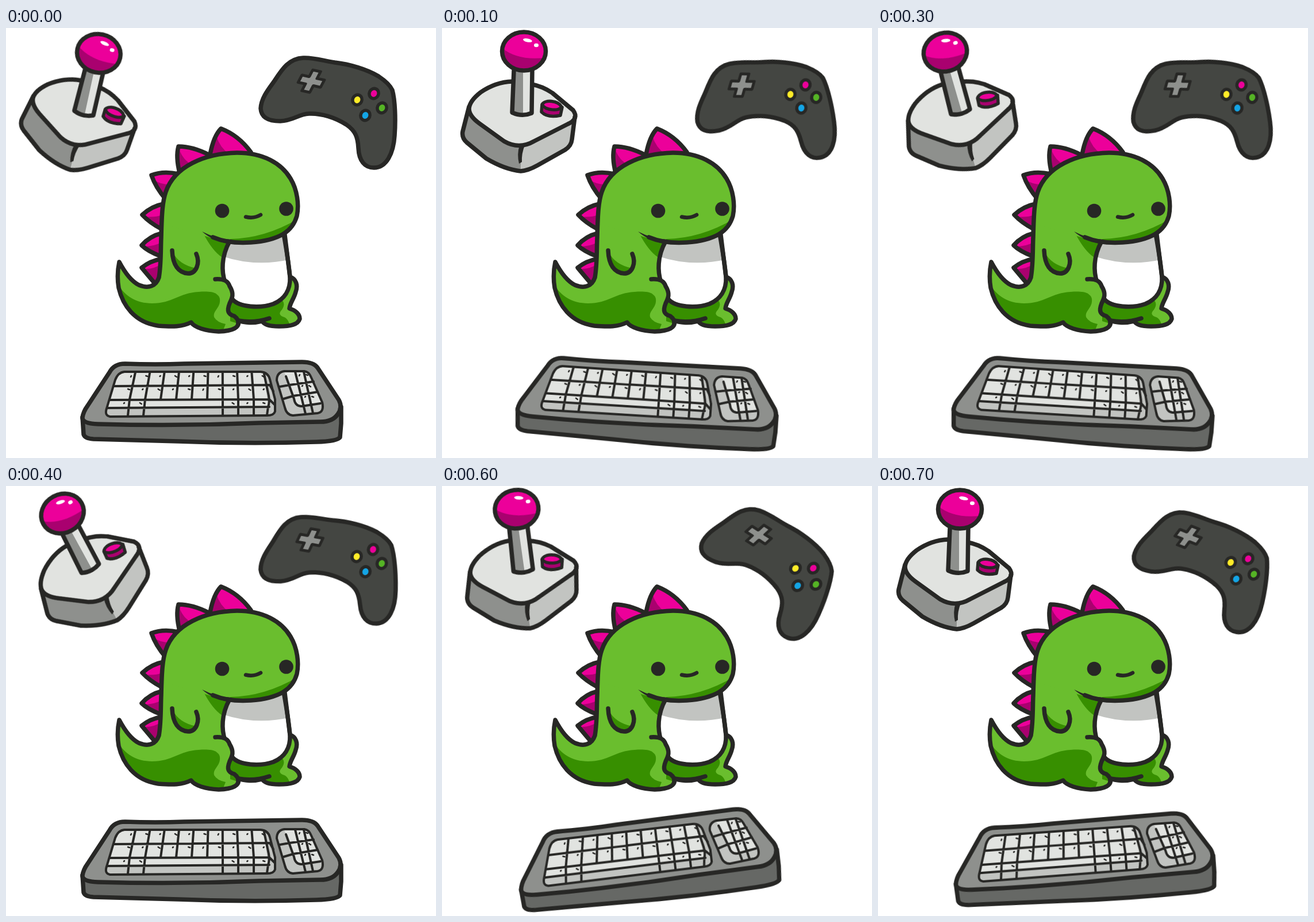
An HTML page for the animation above (800 ms loop, 748 by 748 pixels).

```html
<!DOCTYPE html>
<html lang="en">
<head>
<meta charset="utf-8">
<title>Game time</title>
<style>
html, body { margin: 0; width: 100%; height: 100%; overflow: hidden; background: #fff; }
svg { display: block; width: 100vw; height: 100vh; }
.line { fill: none; stroke: #272725; stroke-width: 7.5; stroke-linecap: round; stroke-linejoin: round; }
.thin { stroke-width: 4; }
.ink { fill: #272725; }
.green { fill: #6abe2e; }
.leaf { fill: #378f00; }
.pink { fill: #ec009a; }
.plum { fill: #a9016f; }
.pale { fill: #e1e3e0; }
.mid { fill: #c2c4c1; }
.grey { fill: #8e908d; }
.slate { fill: #666865; }
.coal { fill: #444642; }
.white { fill: #fff; }
#stick { transform-origin: 134.8px 130.7px; }
#pad { transform-origin: 561px 145px; }
#board { transform-origin: 352px 650px; }
</style>
</head>
<body>
<svg viewBox="0 0 748 748">
<defs>
  <clipPath id="ball"><ellipse cx="142.500" cy="40.500" rx="38" ry="33.500"/></clipPath>
  <clipPath id="belly"><path id="bellyShape" d="M389 371C374 398 375 424 381 442L394 472C406 486 442 488 465 480C484 472 495 456 494 433L484 352Z"/></clipPath>
  <clipPath id="body"><path id="bodyShape" d="M197 407C206 424 217 440 231 447C248 454 261 449 266 434C270 411 269 386 270 364C271 324 272 302 278 285C293 241 345 218 402 217C447 217 479 235 495 262C507 282 510 308 506 327C502 341 494 351 483 358C488 386 492 412 494 433C505 436 508 448 504 459C501 471 494 478 493 488C504 491 511 498 511 506C508 516 495 519 475 519C462 519 449 517 446 510C431 514 415 513 404 509C407 521 395 527 370 528C347 527 328 521 322 512C306 520 290 520 265 518C223 512 203 482 196 452C193 434 194 421 197 407Z"/></clipPath>
</defs>

<g id="stick">
  <path class="grey" d="M47 137L36 180Q34 191 43 199L77 227Q109 246 137 249L139 203L65 166Z"/>
  <path class="mid" d="M139 203L137 249Q150 248 166 239L214 212Q225 205 226 194L231 155Z"/>
  <path class="line pale" d="M122 93Q93 94 67 112Q48 127 47 140Q47 153 65 166L108 197Q134 212 160 197L219 167Q239 158 228 143L192 113Q174 101 156 98Z"/>
  <path class="line" d="M47 137L36 180Q34 191 43 199L77 227Q109 246 137 249Q150 248 166 239L214 212Q225 205 226 194L231 155"/>
  <path class="ink" d="M135 204L144 204Q138 219 139 233L134 236Q130 219 135 204Z"/>
  <path class="plum" d="M174 134V147Q184 156 206 152L209 139Z"/>
  <ellipse class="pink" cx="191" cy="134.500" rx="18" ry="8" transform="rotate(9 191 134)"/>
  <path class="line" style="stroke-width:5.500" d="M174 133C179 124 202 126 208 137C205 145 180 144 174 133L173 146Q184 157 206 152L209 138"/>
  <path class="pale" d="M125 70L123 147Q139 154 156 148L157 70Z"/>
  <path class="grey" d="M125 70L123 147Q132 151 141 151V70Z"/>
  <path class="line" d="M125 74L122 147Q139 155 156 148L157 72"/>
  <ellipse class="pink" cx="142.500" cy="40.500" rx="38" ry="33.500"/>
  <path class="plum" clip-path="url(#ball)" d="M100 31Q130 59 184 51V84H100Z"/>
  <ellipse class="line" cx="142.500" cy="40.500" rx="38" ry="33.500"/>
  <ellipse class="white" cx="149" cy="21.500" rx="8" ry="3" transform="rotate(12 149 21)"/>
  <ellipse class="white" cx="164" cy="30" rx="4" ry="3.300"/>
</g>

<g id="pad">
  <path class="line coal" d="M443 140C444 122 456 107 467 92C480 72 492 53 517 52C535 51 552 57 572 60C598 63 628 72 648 84C660 92 668 99 672 108C677 126 678 160 676 187C674 218 662 243 640 243C624 243 614 231 613 209C612 190 608 179 592 168C573 156 549 148 527 149C508 150 501 161 477 162C455 162 444 155 443 140Z"/>
  <path class="line grey" style="stroke-width:5" transform="matrix(.97 .22 -.47 .9 531 92.500)" d="M-7-20H7V-7H20V7H7V20H-7V7H-20V-7H-7Z"/>
  <g id="dots"></g>
</g>

<g id="board">
  <path class="line slate" d="M133 677L135 707Q137 714 152 715L300 719Q420 724 540 720Q576 719 581 712L583 688V659Z"/>
  <path class="line grey" d="M133 678Q134 668 142 657L180 599Q188 584 207 584Q260 586 310 584L515 581Q535 581 542 591L579 647Q586 660 577 672Q568 685 547 685L440 687Q300 693 160 689Q133 688 133 678Z"/>
  <path class="pale" d="M206 598H443Q456 599 459 611L468 646V667Q466 674 454 674L181 676Q171 674 175 662L190 612Q195 599 206 598Z"/>
  <path class="mid" d="M176 661L456 659L449 602Q457 603 459 611L468 646V667Q466 674 454 674L181 676Q171 674 176 661Z"/>
  <path class="pale" d="M484 597H519Q527 598 531 608L550 651Q554 668 542 670L499 674Q488 673 485 660L471 613Q471 599 484 597Z"/>
  <path class="mid" d="M484 597Q471 599 471 613L485 660Q488 673 499 674L542 670Q552 668 548 653L514 658Q503 658 501 645L487 606Z"/>
  <path class="line thin" id="grid"/>
  <path class="line" style="stroke-width:2.500" id="marks"/>
  <path class="line thin" d="M206 598H443Q456 599 459 611L468 646V667Q466 674 454 674L181 676Q171 674 175 662L190 612Q195 599 206 598Z"/>
  <path class="line thin" d="M484 597H519Q527 598 531 608L550 651Q554 668 542 670L499 674Q488 673 485 660L471 613Q471 599 484 597Z"/>
</g>

<g id="dino">
  <g id="spikes"></g>
  <use href="#bodyShape" class="green"/>
  <g clip-path="url(#body)" class="leaf">
    <path d="M190 438C204 465 224 479 254 479C290 479 300 461 335 459C360 457 373 461 372 475C371 488 358 492 362 503Q367 512 382 515L374 535H190Z"/>
    <path d="M390 470H474Q489 476 480 490Q471 499 484 503Q492 506 496 525H440L390 510Z"/>
    <path d="M343 357Q371 372 391 374Q380 384 376 399Q359 388 343 357Z"/>
  </g>
  <use href="#bellyShape" class="white"/>
  <path class="mid" clip-path="url(#belly)" d="M365 350H500V401Q432 419 365 393Z"/>
  <use href="#bellyShape" class="line"/>
  <g clip-path="url(#body)">
    <path class="green" d="M360 366L270 340V200H520V340L483 357Q430 378 360 366Z"/>
    <path class="leaf" d="M390 367Q450 366 508 332L483 358Q440 376 390 370Z"/>
  </g>
  <use href="#bodyShape" class="line"/>
  <path class="line" d="M483 358C456 374 398 380 360 364"/>
  <path class="ink" d="M341 354Q366 367 392 368V376Q361 372 341 354Z"/>
  <path class="green" d="M358 438Q385 435 391 451Q398 463 390 477Q385 492 390 497L372 500L368 470Z"/>
  <path class="leaf" d="M340 459C362 458 374 463 372 476C371 488 359 493 362 504L340 500Z"/>
  <path class="line" d="M364 437C379 436 386 440 389 449C397 462 394 469 389 479C384 492 386 498 397 501Q405 507 404 514"/>
  <path class="line" d="M404 509Q431 514 458 505"/>
  <path class="leaf" d="M290 390Q301 412 331 418Q326 428 316 427Q296 424 290 390Z"/>
  <path class="line" d="M289 387C290 412 300 426 317 427C331 427 338 409 331 393"/>
  <circle class="ink" cx="376" cy="318" r="12.300"/>
  <circle class="ink" cx="487.500" cy="314.500" r="12.300"/>
  <path class="line" style="stroke-width:6.500" d="M417 328.500Q431 332 443 325"/>
</g>
</svg>
<script>
const $ = id => document.getElementById(id);

// outline, then the shaded part of each back spike
const spikes = [
  ["M355 220Q361 188 374 175Q405 187 426 216", "M356 220L366 188Q372 208 388 219Z"],
  ["M302 252Q295 224 300 206Q325 206 354 221", "M302 252Q297 228 302 213Q309 231 324 238Z"],
  ["M278 298Q260 277 253 256Q274 248 300 254", "M278 298Q263 280 257 264Q270 273 286 272Z"],
  ["M271 350Q250 339 237 325Q253 310 274 306", "M271 350L243 328Q259 330 272 325Z"],
  ["M269 397Q246 388 236 378Q250 362 271 357", "M269 397L241 380Q257 380 270 373Z"],
  ["M257 442Q246 429 236 417Q251 405 269 402", "M257 442L241 419Q256 420 272 410V432Z"]
];
$("spikes").innerHTML = spikes.map(([edge, shade]) =>
  `<path class="pink" d="${edge}Z"/><path class="plum" d="${shade}"/><path class="line" d="${edge}"/>`).join("");

const dots = [[611, 125, "#ffec28"], [640, 114, "#ec009a"], [654, 139, "#55b425"], [625, 152, "#14a5e5"]];
$("dots").innerHTML = dots.map(([x, y, c]) =>
  `<ellipse class="line" style="stroke-width:5.500;fill:${c}" cx="${x}" cy="${y}" rx="8" ry="8.800" transform="rotate(25 ${x} ${y})"/>`).join("");

// keyboard lines
const seg = (x1, y1, x2, y2) => `M${x1} ${y1}L${x2} ${y2}`;
let grid = seg(187, 623, 460, 621) + seg(181, 647, 458, 646) + seg(176, 661, 458, 659) +
  "M449 602L457 640Q459 650 456 659L454 673M459 621L465 632M458 646L468 656" +
  "M487 606L501 645Q503 658 514 658L547 653" +
  "M476 624L493 621L535 615M483 645L500 640L542 633" +
  seg(503, 598, 521, 671) + seg(518, 598, 534, 670);
for (let i = 0; i < 9; i++) {
  const x = 225 + i * 25.3, foot = 215 + i * 27;
  grid += seg(x, 599, foot, 646);
  if (i < 2 || i > 5) grid += seg(foot, 646, foot - (i < 2 ? 3 : 0), 674);
}
$("grid").setAttribute("d", grid);

// small key legends
let marks = "";
const mark = (x, y, i) => marks += `M${x} ${y}l${i % 2 ? 3 : -1} ${i % 3 ? 1 : 2}`;
for (let i = 0; i < 10; i++) {
  mark(218 + i * 25.300, 605, i);
  mark(212 + i * 26.300, 628, i + 1);
  if (i < 2 || i > 6) mark(206 + i * 26.800, 652, i + 2);
}
for (let i = 0; i < 6; i++) mark(511 + i % 2 * 11 + (i >> 1) * 5, 603 + (i >> 1) * 19, i);
$("marks").setAttribute("d", marks);

// pose angles, one per 100 ms
const poses = {
  stick: [12.2, 0, -8, -16.2, -28.7, -16.2, -8, 0],
  pad: [0, -11.4, -22, -11.4, -2.6, 8.9, 20, 8.9],
  board: [0, 3.9, 6.6, 3.9, 0, -4, -6.6, -4]
};
for (const [id, turns] of Object.entries(poses)) {
  const steps = [...turns, turns[0]].map(a => ({ transform: `rotate(${a}deg)`, easing: "step-end" }));
  $(id).animate(steps, { duration: 800, iterations: Infinity }).startTime = 0;
}
</script>
</body>
</html>
```
